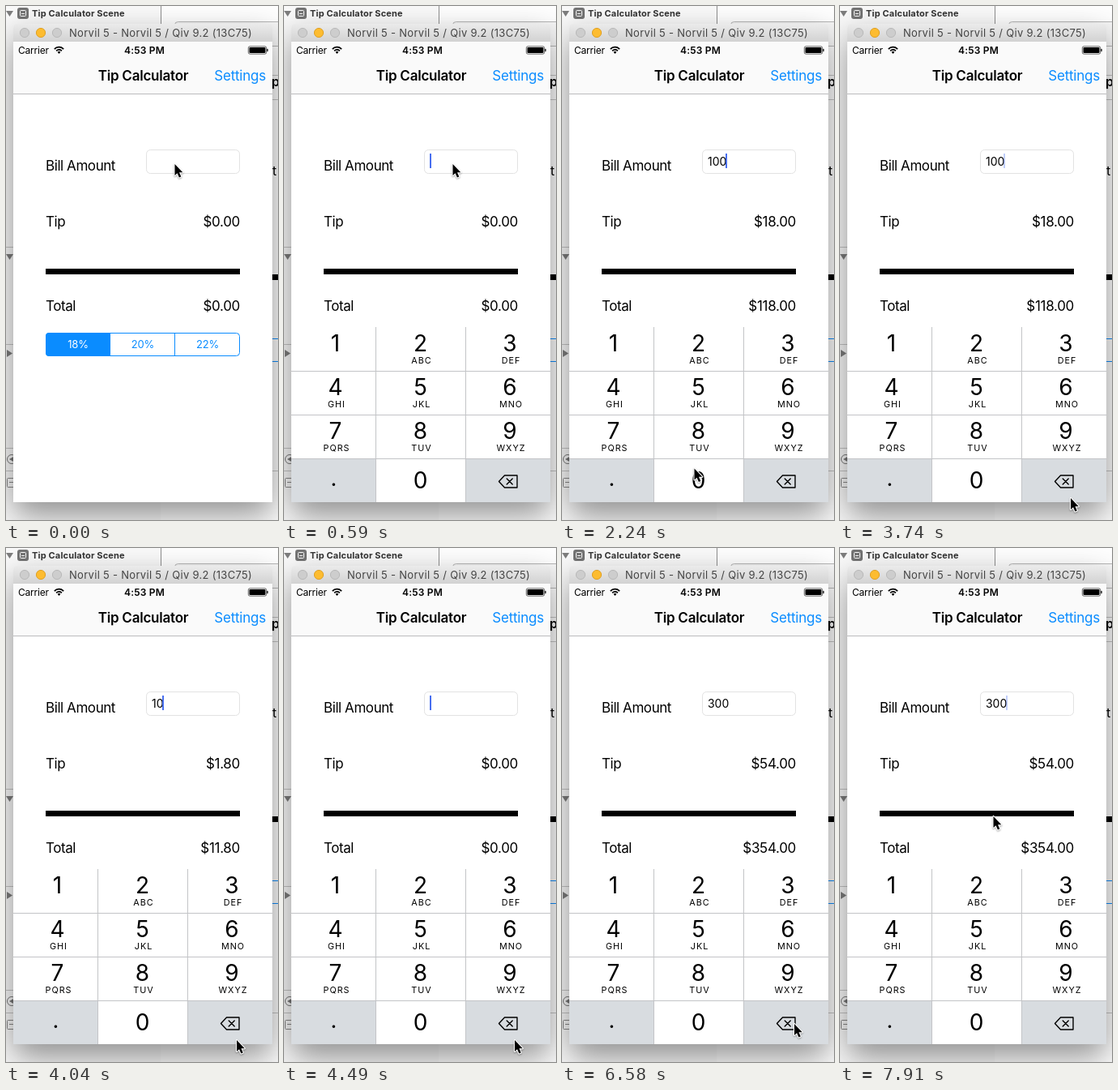
An HTML page with a canvas for the animation above (8 s loop, 336 by 634 pixels).

```html
<!DOCTYPE html>
<html lang="en">
<head>
<meta charset="utf-8">
<title>Tip Calculator</title>
<style>
html, body { margin: 0; width: 100%; height: 100%; overflow: hidden; background: #fff; }
canvas { display: block; width: 336px; height: 634px; }
</style>
</head>
<body>
<canvas id="stage"></canvas>
<script>
const W = 336, H = 634, LOOP = 8000;
const BLUE = '#0a8cff', LINE = '#c3c4c7', KEY_GREY = '#d8dce0', DEL = '<';
const canvas = document.getElementById('stage');
const ctx = canvas.getContext('2d');
const dpr = window.devicePixelRatio || 1;
canvas.width = W * dpr;
canvas.height = H * dpr;

// The screen refreshes in ticks of about 150 ms.
// Taps: tick and key. Stops: tick of arrival, tick of leaving, x, y.
const TAPS = [[6, '1'], [10, '0'], [13, '0'], [25, DEL], [27, DEL], [28, DEL],
  [33, '3'], [37, '0'], [38, '0']];
const STOPS = [[0, 3, 208.5, 195], [6, 7, 55, 421], [9, 20, 163.5, 570.5], [24, 29, 285, 607],
  [33, 34, 276, 415], [36, 40, 168, 577], [43, 48, 287, 587], [52, 53, 189.5, 331]];
const KEYS = ['1', '2', '3', '4', '5', '6', '7', '8', '9', '.', '0', DEL];
const LETTERS = ['', 'ABC', 'DEF', 'GHI', 'JKL', 'MNO', 'PQRS', 'TUV', 'WXYZ'];
const COL_X = [9, 113.5, 224.5, 329], COL_MID = [63.5, 168.5, 279];

const clamp = v => Math.min(1, Math.max(0, v));
const smooth = v => (v = clamp(v)) * v * (3 - 2 * v);

function tickAt(t) {
  if (t < 290) return 0;
  const slip = 10 * ((t > 6500) + (t > 6800) + (t > 7800));
  return 1 + Math.floor((t - 290 + slip) / 150);
}

function pointerAt(n) {
  const i = STOPS.findLastIndex(s => s[0] <= n);
  const [, leave, x, y] = STOPS[i];
  const [arrive, , nx, ny] = STOPS[i + 1] || STOPS[i];
  const f = n > leave ? smooth((n - leave) / (arrive - leave)) : 0;
  return [x + (nx - x) * f, y + (ny - y) * f];
}

// Digits land one tick after the press, deletions at once.
function entryAt(n) {
  let bill = '', since = null, pressed = null;
  for (const [tick, key] of TAPS) {
    const lands = key === DEL ? tick : tick + 1;
    if (tick === n) pressed = key;
    if (lands > n) continue;
    bill = key === DEL ? bill.slice(0, -1) : bill + key;
    since = lands;
  }
  return { bill, since, pressed };
}

function caretAlpha(n, since) {
  if (n < 1) return 0;
  if (since === null) return 1;
  return clamp(0.55 + 0.9 * Math.cos((n - since - 1) * Math.PI * 2 / 7));
}

function rect(x, y, w, h, color) {
  ctx.fillStyle = color;
  ctx.fillRect(x, y, w, h);
}

function paint(fill, stroke, width = 1) {
  if (fill) { ctx.fillStyle = fill; ctx.fill(); }
  if (stroke) { ctx.strokeStyle = stroke; ctx.lineWidth = width; ctx.stroke(); }
}

function box(x, y, w, h, r, fill, stroke, width) {
  ctx.beginPath();
  ctx.roundRect(x, y, w, h, r);
  paint(fill, stroke, width);
}

function poly(points, fill, stroke, width) {
  ctx.beginPath();
  points.forEach(([x, y]) => ctx.lineTo(x, y));
  ctx.closePath();
  paint(fill, stroke, width);
}

function disc(x, y, r, fill, stroke) {
  ctx.beginPath();
  ctx.arc(x, y, r, 0, Math.PI * 2);
  paint(fill, stroke);
}

function text(str, x, y, size, { align = 'left', weight = 400, color = '#000', track = 0 } = {}) {
  ctx.font = `${weight} ${size}px Inter, "Liberation Sans", sans-serif`;
  ctx.letterSpacing = track + 'px';
  ctx.textAlign = align;
  ctx.fillStyle = color;
  ctx.fillText(str, x, y);
  return ctx.measureText(str).width;
}

function label(str, x, y, opts) {
  text(str, x, y, 17, { track: -0.43, ...opts });
}

function drawBackdrop() {
  rect(0, 0, W, H, '#fff');
  rect(0, 0, 191, H, '#fafafa');
  rect(191, 0, 1, 40, '#8e8e8e');
  box(208.5, 19.5, 140, 30, [4, 0, 0, 0], '#f8f8f8', '#b5b5b5');
  for (const y of [297, 417, 545, 573]) rect(0, y, 9, 1, '#c4c4c4');
  for (const y of [85, 115, 573]) rect(329, y, 7, 1, '#c4c4c4');
  for (const y of [6, 306]) poly([[0, y], [9, y], [4.5, y + 7]], '#7d7d7d');
  poly([[1, 424], [8, 428.5], [1, 433]], '#7d7d7d');
  box(14, 2, 14, 14, 3, '#747474');
  box(17.5, 5.5, 7, 7, 1, null, '#fff');
  rect(19, 9, 4, 1, '#fff');
  text('Tip Calculator Scene', 32, 13, 11, { weight: 700, color: '#333', track: 0.17 });
  disc(7, 559, 5.5, null, '#777');
  poly([[4, 559], [9, 556], [9, 562]], '#777');
  box(1.5, 582.5, 11, 11, 1, null, '#888');
  rect(4, 587, 6, 1, '#888');
  text('p', 328, 99, 16, { weight: 600 });
  text('t', 329, 209, 16);
  rect(329, 331, 7, 7, '#000');
  for (const y of [410, 438]) rect(329, y, 7, 1, BLUE);
}

function drawWindow() {
  ctx.save();
  ctx.shadowColor = 'rgba(0,0,0,.44)';
  ctx.shadowBlur = 40 * dpr;
  ctx.shadowOffsetY = 16 * dpr;
  box(9, 23, 320, 589, [5, 5, 0, 0], '#fff');
  ctx.restore();
  const bar = ctx.createLinearGradient(0, 22, 0, 44);
  bar.addColorStop(0, '#ebebeb');
  bar.addColorStop(1, '#d2d2d2');
  box(9, 22, 320, 22, [5, 5, 0, 0], bar);
  disc(23, 33, 5.6, '#cdcdcd', '#b9b9b9');
  disc(43, 33, 5.6, '#fdbc30', '#dfa023');
  disc(63, 33, 5.6, '#cdcdcd', '#b9b9b9');
  text('Norvil 5 - Norvil 5 / Qiv 9.2 (13C75)', 78, 38, 13, { color: '#444', track: 0.3 });
}

function drawStatus() {
  rect(9, 44, 320, 64, '#fafafa');
  rect(9, 108, 320, 1, '#bcbcbe');
  text('Carrier', 15, 59, 12, { track: -0.2 });
  text('4:53 PM', 171, 59, 12, { weight: 600, align: 'center', track: 0.2 });
  for (const r of [4.6, 7.8]) {
    ctx.beginPath();
    ctx.arc(65.5, 58.5, r, -Math.PI * 0.76, -Math.PI * 0.24);
    paint(null, '#000', 1.7);
  }
  poly([[63.6, 56.7], [65.5, 55.7], [67.4, 56.7], [65.5, 58.9]], '#000');
  box(299.3, 49.8, 22.4, 9.4, 2, '#fafafa', '#000', 0.6);
  box(300.5, 51, 20, 7, 1, '#000');
  box(322.3, 52.8, 1.3, 3.4, 0.7, '#000');
  label('Tip Calculator', 169.5, 92, { weight: 600, align: 'center', track: -0.22 });
  label('Settings', 321, 92, { align: 'right', color: BLUE, track: -0.23 });
}

function drawForm(bill, caret) {
  const right = { align: 'right', track: -0.3 };
  const tip = Number(bill) * 0.18;
  label('Bill Amount', 49, 203);
  label('Tip', 49, 272);
  label('Total', 49, 376);
  label('$' + tip.toFixed(2), 289, 272, right);
  label('$' + (Number(bill) + tip).toFixed(2), 289, 376, right);
  rect(49, 324, 240, 7, '#000');

  box(173.5, 177.5, 115, 29, 5, '#fff', '#e2e2e2');
  const end = text(bill, 180, 197, 14, { track: -0.05 });
  ctx.globalAlpha = caret;
  rect(180 + Math.round(end) - (bill ? 1 : 0), 182, 2, 18, '#486ff0');
  ctx.globalAlpha = 1;

  box(49.5, 403.5, 239, 28, 4, '#fff', BLUE);
  box(49, 403, 80, 29, [4, 0, 0, 4], BLUE);
  rect(208, 403, 1, 29, BLUE);
  ['18%', '20%', '22%'].forEach((s, i) =>
    text(s, 89 + i * 80, 422, 13, { align: 'center', track: -0.2, color: i ? BLUE : '#fff' }));
}

function drawDelete() {
  ctx.lineJoin = ctx.lineCap = 'round';
  poly([[265.5, 586.5], [272.5, 579], [288, 579], [288, 594], [272.5, 594]], null, '#000', 1.4);
  ctx.beginPath();
  for (const d of [-3.5, 3.5]) {
    ctx.moveTo(278.7 - d, 583);
    ctx.lineTo(278.7 + d, 590);
  }
  paint(null, '#000', 1.4);
}

function drawKeyboard(shown, pressed) {
  if (!shown) return;
  ctx.save();
  ctx.beginPath();
  ctx.rect(9, 396, 320, 216);
  ctx.clip();
  ctx.translate(0, 216 * (1 - shown));
  KEYS.forEach((key, i) => {
    const col = i % 3, y = 396 + 54 * Math.floor(i / 3);
    const x = COL_X[col], mid = COL_MID[col];
    const grey = (key === '.' || key === DEL) !== (key === pressed);
    rect(x, y, COL_X[col + 1] - x, 54, grey ? KEY_GREY : '#fff');
    if (key === DEL) drawDelete();
    else if (key === '.') text(key, 61.5, 592, 27, { align: 'center' });
    else text(key, mid, y + (i < 9 ? 30 : 37), 28, { align: 'center' });
    if (LETTERS[i]) text(LETTERS[i], mid + 1.5, y + 45, 10.8, { align: 'center', track: 1 });
  });
  for (const x of [113, 224]) rect(x, 396, 1, 216, LINE);
  for (const y of [450, 504, 558]) rect(9, y, 320, 1, LINE);
  ctx.restore();
}

function drawPointer(x, y) {
  ctx.save();
  ctx.translate(x, y);
  ctx.lineJoin = 'round';
  ctx.shadowColor = 'rgba(0,0,0,.35)';
  ctx.shadowBlur = 2 * dpr;
  ctx.shadowOffsetY = dpr;
  poly([[0, 0], [0, 14], [3.1, 11.2], [5.4, 16.6], [7.8, 15.6], [5.5, 10.3], [9.8, 10.3]],
    null, '#fff', 2.2);
  ctx.shadowColor = 'transparent';
  paint('#000');
  ctx.restore();
}

function draw(n) {
  const { bill, since, pressed } = entryAt(n);
  ctx.setTransform(dpr, 0, 0, dpr, 0, 0);
  drawBackdrop();
  drawWindow();
  drawStatus();
  drawForm(bill, caretAlpha(n, since));
  drawKeyboard(smooth(n / 3), pressed);
  drawPointer(...pointerAt(n));
}

const start = performance.now();
function loop() {
  draw(tickAt((performance.now() - start) % LOOP));
  requestAnimationFrame(loop);
}
loop();
</script>
</body>
</html>
```
